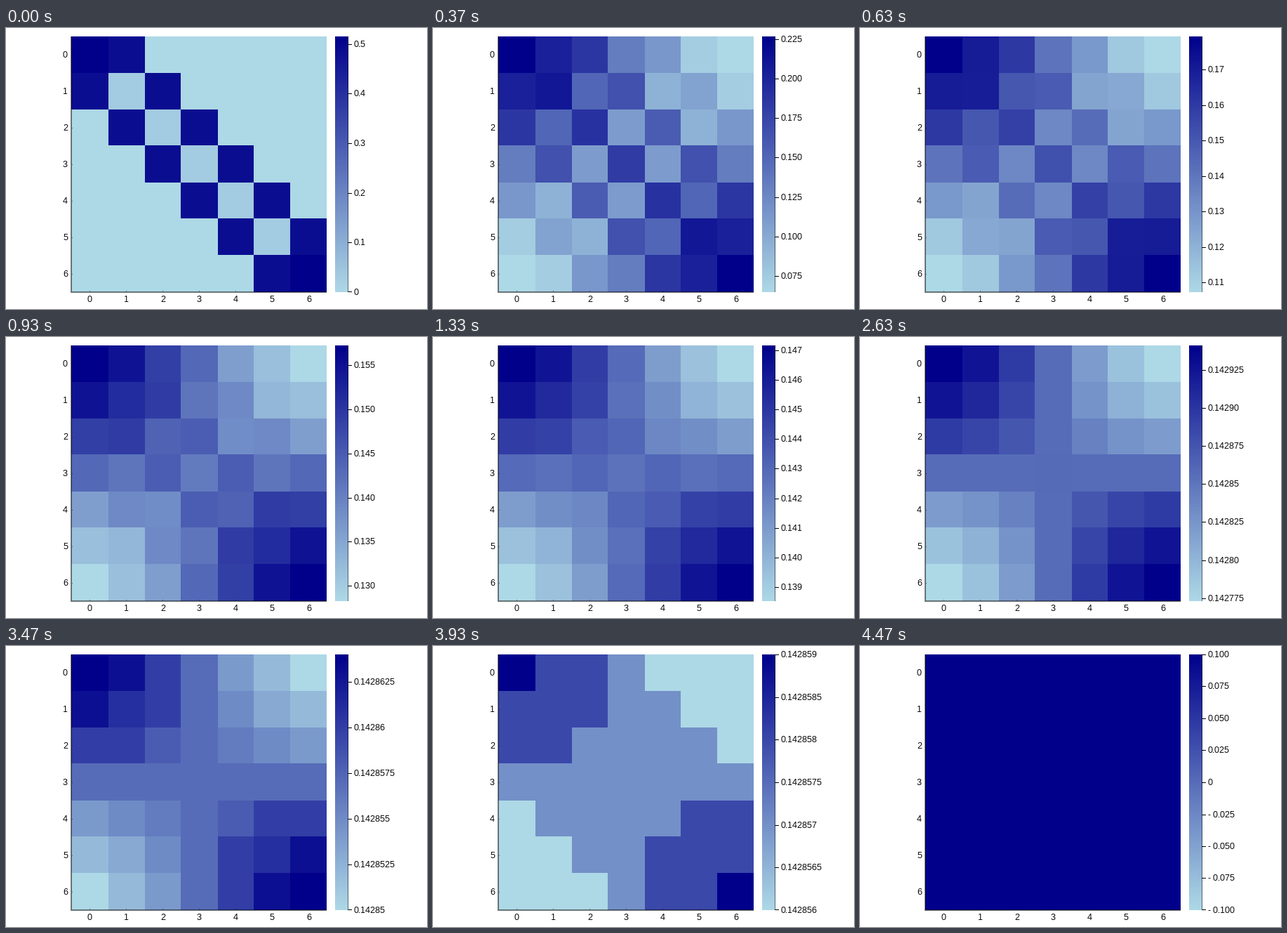
A matplotlib script that plays this animation: 600x400 px, repeating every 6010 ms.

```python
import math

import matplotlib.pyplot as plt
import numpy as np
from matplotlib.animation import FuncAnimation
from matplotlib.transforms import IdentityTransform

W, H, DPI = 600, 400, 100
LEFT, TOP, SIZE = 93, 12, 364
BAR_LEFT, BAR_RIGHT = 469, 488
LIGHT = np.array([173, 216, 230])
DARK = np.array([0, 0, 139])
STATES = 7
INNER_EDGES = [53, 105, 156, 209, 260, 312]

plt.rcParams.update({
    "font.family": "Liberation Sans",
    "font.size": 12 * 72 / DPI,
    "text.hinting": "default",
    "text.hinting_factor": 1,
})


def walk_matrix(move=0.485):
    """Lazy random walk on a line with reflecting ends."""
    p = move * (np.eye(STATES, k=1) + np.eye(STATES, k=-1))
    return p + np.diag(1 - p.sum(axis=1))


def shade(t):
    level = np.round(np.clip(t, 0, 1) * 255)[..., None] / 255
    return np.round(LIGHT + (DARK - LIGHT) * level).astype(np.uint8)


def tick_step(span):
    exponent = math.log10(span * (1 + 1e-9))
    power = math.floor(exponent)
    factor = 10 ** (exponent - power)
    unit = 1 if factor > 5 else 0.5 if factor > 2.5 else 0.25
    return unit * 10.0 ** power


def tick_label(value, step):
    if abs(value) < step / 2:
        return "0"
    whole, decimals = f"{abs(value):.9f}".split(".")
    width = len(f"{step:g}".partition(".")[2])
    sign = "- " if value < 0 else ""
    return f"{sign}{whole}.{decimals.rstrip('0').ljust(width, '0')}"


def darken(region):
    region[...] = region // 2


def put_text(x, baseline, text=""):
    return fig.text(x, H - baseline, text, transform=IdentityTransform(),
                    ha="left", va="baseline", color="black")


P = walk_matrix()
COLS = np.digitize(np.arange(SIZE), INNER_EDGES)
ROWS = np.digitize(np.arange(SIZE) + 1, INNER_EDGES)
BAR = shade(np.linspace(1, 0, SIZE))[:, None]

fig = plt.figure(figsize=(W / DPI, H / DPI), dpi=DPI, facecolor="white")
canvas = np.full((H, W, 3), 255, np.uint8)
picture = fig.figimage(canvas, 0, 0, origin="upper")

for i in range(STATES):
    put_text(116 + 52 * i, 390, str(i))
    put_text(81, 42 + 52 * i, str(i))
bar_labels = [put_text(496, 0) for _ in range(13)]


def paint_axes(img):
    bottom = TOP + SIZE
    darken(img[TOP:bottom + 1, LEFT - 1:LEFT + 1])
    darken(img[bottom - 1:bottom + 1, LEFT + 1:LEFT + SIZE])
    for i in range(STATES):
        darken(img[bottom - 2, 119 + 52 * i])
        darken(img[38 + 52 * i, LEFT + 1])
    darken(img[TOP:bottom, BAR_RIGHT - 1])


def update(frame):
    # Thirty steps per second, shown on a 10 ms clock.
    step_no = math.floor(0.3 * frame + 0.15)
    z = np.round(np.linalg.matrix_power(P, step_no + 1), 6)
    lo, hi = z.min(), z.max()
    if hi - lo < 5e-7:
        lo, hi = -0.1, 0.1

    img = np.full((H, W, 3), 255, np.uint8)
    colors = shade((z - lo) / (hi - lo))
    img[TOP:TOP + SIZE, LEFT:LEFT + SIZE] = colors[ROWS][:, COLS]
    img[TOP:TOP + SIZE, BAR_LEFT:BAR_RIGHT] = BAR
    paint_axes(img)

    step = tick_step(hi - lo)
    first = math.ceil(lo / step - 1e-6)
    last = math.floor(hi / step + 1e-6)
    for i, label in enumerate(bar_labels):
        value = (first + i) * step
        label.set_visible(first + i <= last)
        if first + i > last:
            continue
        y = round(TOP + SIZE * (hi - value) / (hi - lo))
        img[min(y, TOP + SIZE - 1), BAR_RIGHT - 1:BAR_RIGHT + 5] = 0
        label.set_text(tick_label(value, step))
        label.set_y(H - y - 4)

    picture.set_data(img)
    return [picture, *bar_labels]


anim = FuncAnimation(fig, update, frames=601, interval=10, repeat=True,
                     repeat_delay=0, cache_frame_data=False)
plt.show()
```
